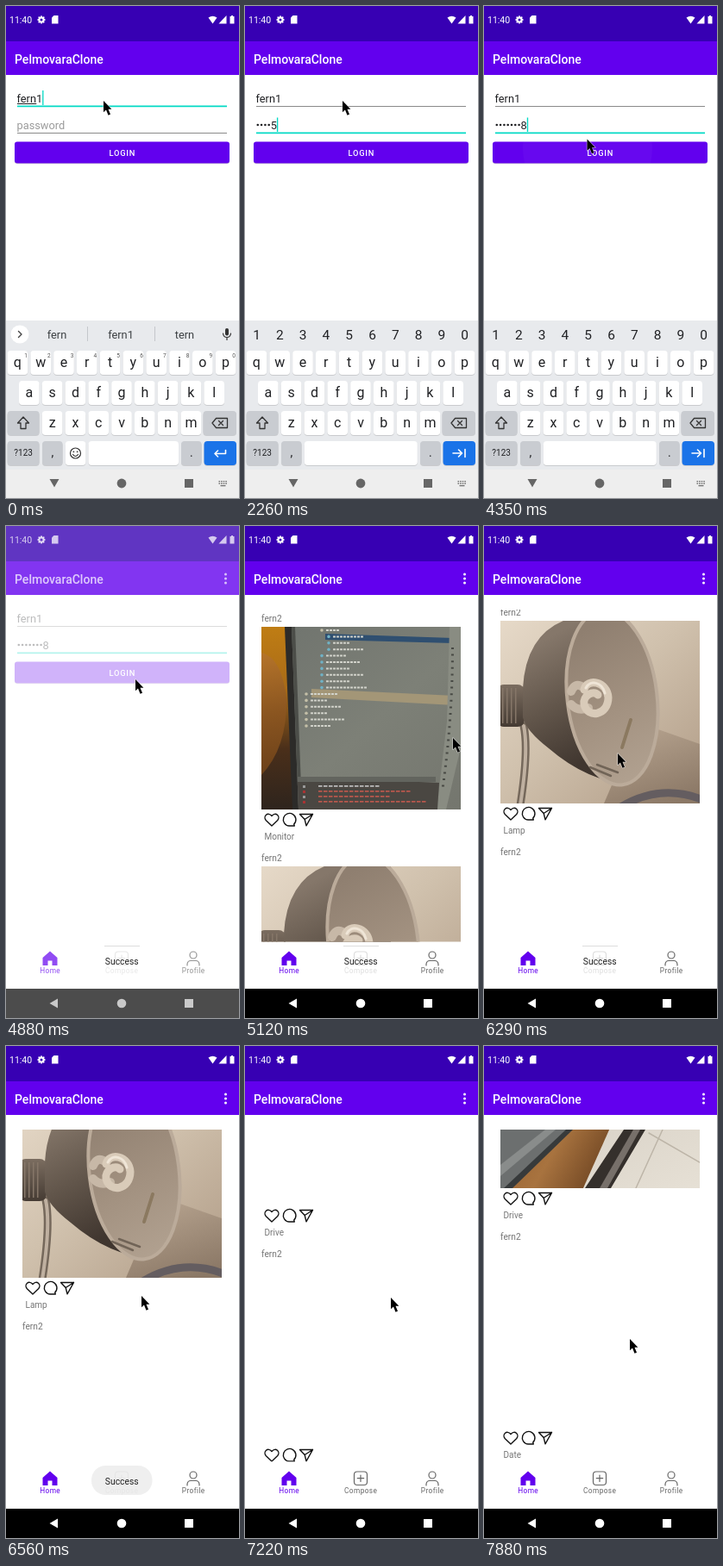
An HTML page with a canvas for the animation above (8000 ms loop, 270 by 571 pixels).

```html
<!DOCTYPE html>
<html lang="en">
<head>
<meta charset="utf-8">
<title>Photo feed login</title>
<style>
html, body { margin: 0; width: 100%; height: 100%; overflow: hidden; background: #fff; }
canvas { display: block; width: 270px; height: 571px; }
</style>
</head>
<body>
<canvas></canvas>
<script>
const LOOP = 8000;
const PURPLE = '#6200ee', TEAL = '#03dac5', INK = '#202124', GREY = '#757575';
const APP = 'PelmovaraClone', USER = 'fern';

const canvas = document.querySelector('canvas');
const c = canvas.getContext('2d');
const dpr = window.devicePixelRatio || 1;
canvas.width = 270 * dpr;
canvas.height = 571 * dpr;

// Each track holds its value until the next key: [time, ...value]
const POINTER = [
  [0, 113, 110], [3930, 115, 127], [4050, 118, 147], [4190, 119.5, 154.5],
  [4880, 150, 178], [5000, 200, 215], [5120, 241, 246], [5390, 222, 292],
  [5510, 172, 352], [5630, 141, 379], [5770, 138, 398], [5890, 137.5, 415],
  [6040, 142.5, 314], [6160, 150, 270], [6290, 155, 264], [6410, 157, 275],
  [6560, 157, 290], [6680, 161, 340], [6820, 166, 395], [6950, 168, 380],
  [7070, 168, 310], [7220, 169, 292], [7340, 169, 305], [7490, 169, 320], [7880, 169, 340]
];
const SCROLL = [
  [0, 0], [6040, 69], [6160, 200], [6290, 285], [6410, 325], [6560, 338],
  [6950, 430], [7070, 640], [7220, 700], [7340, 712], [7490, 716], [7610, 718], [7880, 720]
];
const RIPPLE = [[0, 0], [4350, 75], [4470, 125], [4590, 150], [4730, 0]];
const TOAST = [[0, 0], [4730, .5], [4880, 1], [6820, .75], [6950, .35], [7070, 0]];
const TYPED = [810, 1080, 1200, 1980, 2260, 2540, 2850, 2970];

const at = (track, t) => track.findLast(k => k[0] <= t).slice(1);
const between = (t, a, b) => t >= a && t < b;

function text(s, x, y, size, color, { weight = 400, align = 'left', spacing = 0 } = {}) {
  c.font = `${weight} ${size}px Roboto, sans-serif`;
  c.letterSpacing = spacing + 'px';
  c.textAlign = align;
  c.fillStyle = color;
  c.fillText(s, x, y);
  return c.measureText(s).width;
}
function rect(x, y, w, h, color, r = 0) {
  c.fillStyle = color;
  c.beginPath();
  c.roundRect(x, y, w, h, r);
  c.fill();
}
function dot(x, y, r, color) {
  c.fillStyle = color;
  c.beginPath();
  c.arc(x, y, r, 0, 7);
  c.fill();
}
function fill(d, color) {
  c.fillStyle = color;
  c.fill(new Path2D(d));
}
function line(d, color, width = 1) {
  c.strokeStyle = color;
  c.lineWidth = width;
  c.lineJoin = c.lineCap = 'round';
  c.stroke(new Path2D(d));
}
function group(x, y, draw) {
  c.save();
  c.translate(x, y);
  draw();
  c.restore();
}
function clip(x, y, w, h, draw) {
  c.save();
  c.beginPath();
  c.rect(x, y, w, h);
  c.clip();
  draw();
  c.restore();
}
function gradient(x0, y0, x1, y1, ...colors) {
  const g = c.createLinearGradient(x0, y0, x1, y1);
  colors.forEach((color, i) => g.addColorStop(i / (colors.length - 1), color));
  return g;
}

function appBars() {
  rect(0, 0, 270, 41, '#3700b3');
  rect(0, 41, 270, 39, PURPLE);
  text('11:40', 4, 20, 10.5, '#fff');
  for (let i = 0; i < 8; i++) {
    const a = i * Math.PI / 4;
    dot(41 + 3.6 * Math.cos(a), 16 + 3.6 * Math.sin(a), 1.1, '#fff');
  }
  dot(41, 16, 3.5, '#fff');
  dot(41, 16, 1.5, '#3700b3');
  fill('M55.5 11H60.5V20.5H53V13.5Z', '#fff');
  fill('M239.5 20.5L234.5 13.5Q239.5 10 244.5 13.5Z', '#fff');
  fill('M255.5 11V20.5H246.5Z', '#fff');
  fill('M261 11H263V12H264.5V20.5H259.5V12H261Z', '#fff');
  text(APP, 10, 66.5, 14, '#fff', { weight: 500 });
}

function field(y, focused) {
  if (focused) rect(13, y - 1, 243, 1.7, TEAL);
  else rect(13, y - .5, 243, 1, '#8a8a8a');
}

function login(t) {
  const onPassword = t >= 280;
  rect(0, 0, 270, 571, '#fff');
  appBars();

  const nameWidth = text(USER + '1', 12.5, 111.5, 12.8, INK);
  field(116.5, !onPassword);
  if (!onPassword) {
    rect(13, 113, nameWidth * .75, 1, INK);
    rect(12.5 + nameWidth, 98, 1.3, 17, TEAL);
  }

  field(147.5, onPassword);
  const count = TYPED.filter(k => k <= t).length;
  let caret = 12.5;
  if (count) {
    for (let i = 1; i < count; i++, caret += 4.3) dot(caret + 2.3, 138, 1.3, INK);
    caret += text(count, caret, 142.5, 12.8, INK);
  } else text('password', 12.5, 142.5, 12.8, '#9a9a9a');
  const blinkOff = between(t, 1700, 1980) || between(t, 3470, 3930) || t >= 4470;
  if (onPassword && !blinkOff) rect(caret, 129.5, 1.4, 16.5, TEAL);

  rect(10, 158, 249, 25.3, '#0003', 3);
  rect(10, 157.5, 249, 25, PURPLE, 3);
  const [ripple] = at(RIPPLE, t);
  if (ripple) clip(10, 157.5, 249, 25, () => dot(120, 165, ripple, '#ffffff08'));
  text('LOGIN', 134.8, 173.7, 9.3, '#fff', { weight: 500, align: 'center', spacing: .8 });

  if (t < 4880) keyboard(onPassword);
}

function key(x, y, w, label, color = '#fff', size = 16) {
  rect(x, y + 1, w, 28, '#0002', 4);
  rect(x, y, w, 28, color, 4);
  text(label, x + w / 2, y + 14 + size * .32, size, INK, { align: 'center' });
}

function keyboard(forPassword) {
  const side = '#c9ccd1', digits = '1234567890', mid = { align: 'center' };
  rect(0, 365, 270, 173, '#e8eaed');
  if (forPassword) {
    [...digits].forEach((d, i) => text(d, 13.5 + 26.8 * i, 387, 15.5, INK, mid));
  } else {
    dot(16, 381, 10.5, '#fff');
    line('M14.5 377.5L18 381L14.5 384.5', '#444', 1.4);
    [USER, USER + '1', 'tern'].forEach((s, i) => text(s, 59 + 74 * i, 385.5, 12.8, '#3c4043', mid));
    rect(94, 372, 1, 17, '#c4c7cb');
    rect(172, 372, 1, 17, '#c4c7cb');
    rect(254, 374, 4, 8.5, '#333', 2);
    line('M251.5 380Q252 384.5 256 384.5Q260 384.5 260.5 380M256 385V387.5', '#333', 1.2);
  }
  [['qwertyuiop', 1.6, 400], ['asdfghjkl', 15, 435], ['zxcvbnm', 41.8, 470]].forEach(([row, x, y]) =>
    [...row].forEach((ch, i) => key(x + 26.8 * i, y, 23.6, ch)));
  if (!forPassword) [...digits].forEach((d, i) => text(d, 23 + 26.8 * i, 408, 6.5, '#555', mid));

  key(1.6, 470, 37, '', side);
  line('M20 477L13.5 484H17V490.5H23V484H26.5Z', '#333', 1.3);
  key(228.5, 470, 38.5, '', side);
  line('M239 484L243.5 478.5H256.5V489.5H243.5ZM246.5 481.5L251.5 486.5M251.5 481.5L246.5 486.5', '#333', 1.3);

  key(1.6, 505, 37, '?123', side, 10);
  key(42, 505, 23.6, ',', side, 14);
  if (forPassword) key(68.8, 505, 131, '');
  else {
    key(68.8, 505, 23.6, '');
    key(95.5, 505, 104.5, '');
    line('M86.5 519A6 6 0 1 1 74.5 519A6 6 0 1 1 86.5 519M77.5 520.5Q80.5 524.5 83.5 520.5', '#333', 1.2);
    dot(78.4, 517.3, .9, '#333');
    dot(82.6, 517.3, .9, '#333');
  }
  key(203, 505, 23.6, '.', side, 14);
  key(229.5, 505, 37.5, '', '#1a73e8');
  line(forPassword
    ? 'M241 519H251.5M247.5 515L251.5 519L247.5 523M255 514.5V523.5'
    : 'M254.5 515.5V519.5H242M245.5 516L242 519.5L245.5 523', '#fff', 1.6);

  rect(0, 538, 270, 33, '#eeeeee');
  fill('M50.5 549H61.5L56 558.5Z', '#666');
  dot(134, 554, 5.4, '#666');
  rect(207, 549, 10, 10, '#666');
  for (let i = 0; i < 8; i++) rect(246.5 + i % 4 * 2.6, 551 + (i >> 2) * 2.5, 1.6, 1.5, '#777');
  rect(248.5, 556, 6, 1.4, '#777');
}

function monitorPhoto() {
  rect(0, 0, 231, 212, gradient(0, 0, 0, 212, '#bf7d14', '#a96b18', '#4a2f1a', '#2e241d'));
  fill('M0 30Q24 36 29 84Q30 140 0 172Z', gradient(0, 30, 20, 172, '#b5742a', '#8a5520', '#6b4019'));
  fill('M27 0H231V212H36Z', '#2c2b29');
  fill('M35 0H231V212H43Z', gradient(40, 0, 231, 212, '#71756f', '#7d8077', '#74766e'));
  fill('M35 0H39L47 212H43Z', '#4c4e49');
  fill('M74 8L222 13V19L74 15Z', '#2f4f70');
  fill('M58 72L224 80V91L58 82Z', '#a39677');
  for (let i = 0; i < 16; i++) {
    const nested = i > 0 && i < 4, outer = i > 9, x = outer ? 52 : nested ? 78 : 70, y = 4 + i * 7.4;
    dot(x, y, 1.8, outer || !i ? '#c4bfa8' : '#6fb2c6');
    for (let w = 0; w < 16 + i * 17 % 31; w += 4) rect(x + 5 + w, y - 1, 3, 2, '#d0d1c9');
  }
  fill('M218 0H231V140L214 212H203L215 110Z', '#898c82');
  for (let i = 0; i < 22; i++) rect(220 - i * i * .025, 24 + i * 7.6, 3, 2, '#484a45');
  fill('M42 174L206 181L204 212H43Z', '#4a4742');
  rect(42, 174, 160, 6, '#62645e');
  for (let i = 0; i < 4; i++) {
    for (let w = 0; w < 70 + i * 37 % 60; w += 6) rect(66 + w, 184 + i * 6, 4.5, 1.8, i ? '#b8574c' : '#bbb');
    rect(48, 184 + i * 6, 3, 3, i % 2 ? '#a33' : '#999');
  }
}

function lampPhoto() {
  rect(0, 0, 231, 212, gradient(0, 0, 190, 212, '#e6d9c8', '#d0c1ad', '#b5a18c'));
  fill('M160 118L231 143V212H120Z', gradient(170, 125, 200, 212, '#b3a08c', '#8b7866'));
  line('M138 217Q185 188 235 208', '#645d60', 9);
  line('M27 122Q33 150 23 214', '#75685b', 9);
  line('M27 122Q33 150 23 214', '#bfb0a0', 4);
  rect(-4, 74, 32, 49, gradient(0, 74, 0, 123, '#7b6d60', '#453b33'), 8);
  for (let i = 0; i < 4; i++) rect(2 + i * 5, 78, 1.5, 41, '#857668');
  fill('M26 78Q30 10 85 -4H150V190Q100 186 56 148Q30 128 26 112Z',
    gradient(35, 30, 105, 160, '#85776a', '#62564b', '#40362f'));
  c.save();
  c.beginPath();
  c.ellipse(129.5, 89, 52, 102, -.12, 0, 7);
  c.fillStyle = gradient(80, 20, 175, 190, '#8f7f70', '#a29180', '#b3a392');
  c.fill();
  c.strokeStyle = '#bbab9a';
  c.stroke();
  c.restore();
  line('M82 82Q86 72 94 76M82 97Q90 106 102 101', '#c7b8a7', 10);
  line('M97 80C100 66 124 70 125 89C125 110 101 114 97 97C95 87 108 80 113 86', '#d9cbb9', 9);
  line('M99 78C104 68 118 71 121 84', '#efe5d7', 3);
  line('M151 115L141 147', '#8b7960', 4);
  line('M104 170L128 180M112 167L136 176', '#716457', 2.5);
}

function drivePhoto() {
  rect(0, 0, 231, 212, gradient(130, 0, 231, 212, '#cfc8bd', '#e6e0d5'));
  fill('M0 0H190L96 212H0Z', gradient(0, 150, 110, 212, '#95602f', '#a8733f', '#6f4522'));
  fill('M0 0H130L80 147L12 212H0Z', '#6c6f6f');
  fill('M76 144L84 144L14 212H4Z', '#373a3b');
  fill('M0 185L52 144H64L0 198Z', '#898c8b');
  fill('M200 40L168 144L128 212H98L143 144Z', '#35302c');
  fill('M154 144H162L124 212H115Z', '#77706a');
  line('M231 182L172 148M157 212L188 144', '#bdb5a8', 1.5);
}

const POSTS = [['Monitor', monitorPhoto, 0], ['Lamp', lampPhoto, 0], ['Drive', drivePhoto, 7490], ['Date']];

function post([caption, photo, loadedAt], t) {
  text(USER + '2', 19, 111, 10.2, GREY);
  if (photo && t >= loadedAt) group(19, 117, () => clip(0, 0, 231, 212, photo));
  line('M31 348L24.2 341.5C20.5 337 26.5 331 31 336.5C35.5 331 41.5 337 37.8 341.5Z', '#111', 1.4);
  line('M56.7 346L57.3 348H51.2A7.3 7.3 0 1 1 56.7 346Z', '#111', 1.4);
  line('M63.5 334.5H78.5L71 347.8L69.2 340.5ZM69.2 340.5L78.5 334.5', '#111', 1.4);
  text(caption, 22.5, 363.5, 10, GREY);
}

function toast(t) {
  const [alpha] = at(TOAST, t);
  if (!alpha) return;
  c.save();
  c.globalAlpha *= alpha;
  if (between(t, 4880, 6560)) {
    rect(99, 487, 70.5, 34, '#ffffffc8', 16.5);
    rect(114, 487, 41, 1, '#ddd');
  } else if (t >= 6560) rect(99, 487, 70.5, 34, '#eeeeeef0', 16.5);
  text('Success', 134.2, 508.5, 10.3, '#222', { align: 'center' });
  c.restore();
}

function home(t) {
  rect(0, 0, 270, 571, '#fff');
  appBars();
  [56, 61, 66].forEach(y => dot(254.5, y, 1.5, '#fff'));
  if (t >= 5000) clip(0, 97, 270, 385.5, () =>
    POSTS.forEach((p, i) => group(0, 278 * i - at(SCROLL, t)[0], () => post(p, t))));

  fill('M51 493.5L59.5 501V510H53.5V504.5H48.5V510H42.5V501Z', PURPLE);
  c.strokeStyle = '#666';
  c.lineWidth = 1.2;
  c.beginPath();
  c.roundRect(126.5, 494, 15, 15.5, 3.5);
  c.stroke();
  line('M134 498V505.5M130.3 501.7H137.7', '#666', 1.2);
  line('M221 498A4 4 0 1 1 213 498A4 4 0 1 1 221 498M210 510V508.5Q210.5 504.5 214 504.5H220Q223.5 504.5 224 508.5V510', '#666', 1.2);
  [['Home', 51, PURPLE], ['Compose', 134, '#666'], ['Profile', 217, '#666']].forEach(([s, x, color]) =>
    text(s, x + .2, 519.2, 8.3, color, { align: 'center', spacing: .4 }));

  rect(0, 537, 270, 34, '#000');
  fill('M50.5 554L60 548.5V559.5Z', '#fff');
  dot(134, 554, 5.3, '#fff');
  rect(207, 549, 10, 10, '#fff');
}

function pointer(t) {
  group(...at(POINTER, t), () => {
    const arrow = 'M0 0V13.3L3 10.6L5.5 16.7L8 15.7L5.5 9.8H9.4Z';
    line(arrow, '#fff8', 1.4);
    fill(arrow, '#000');
  });
}

function frame(now) {
  const t = now % LOOP;
  c.setTransform(dpr, 0, 0, dpr, 0, 0);
  if (t < 5000) login(t);
  if (t >= 4880) {
    c.save();
    if (t < 5000) c.globalAlpha = .7;
    home(t);
    c.restore();
  }
  toast(t);
  pointer(t);
  requestAnimationFrame(frame);
}
requestAnimationFrame(frame);
</script>
</body>
</html>
```
